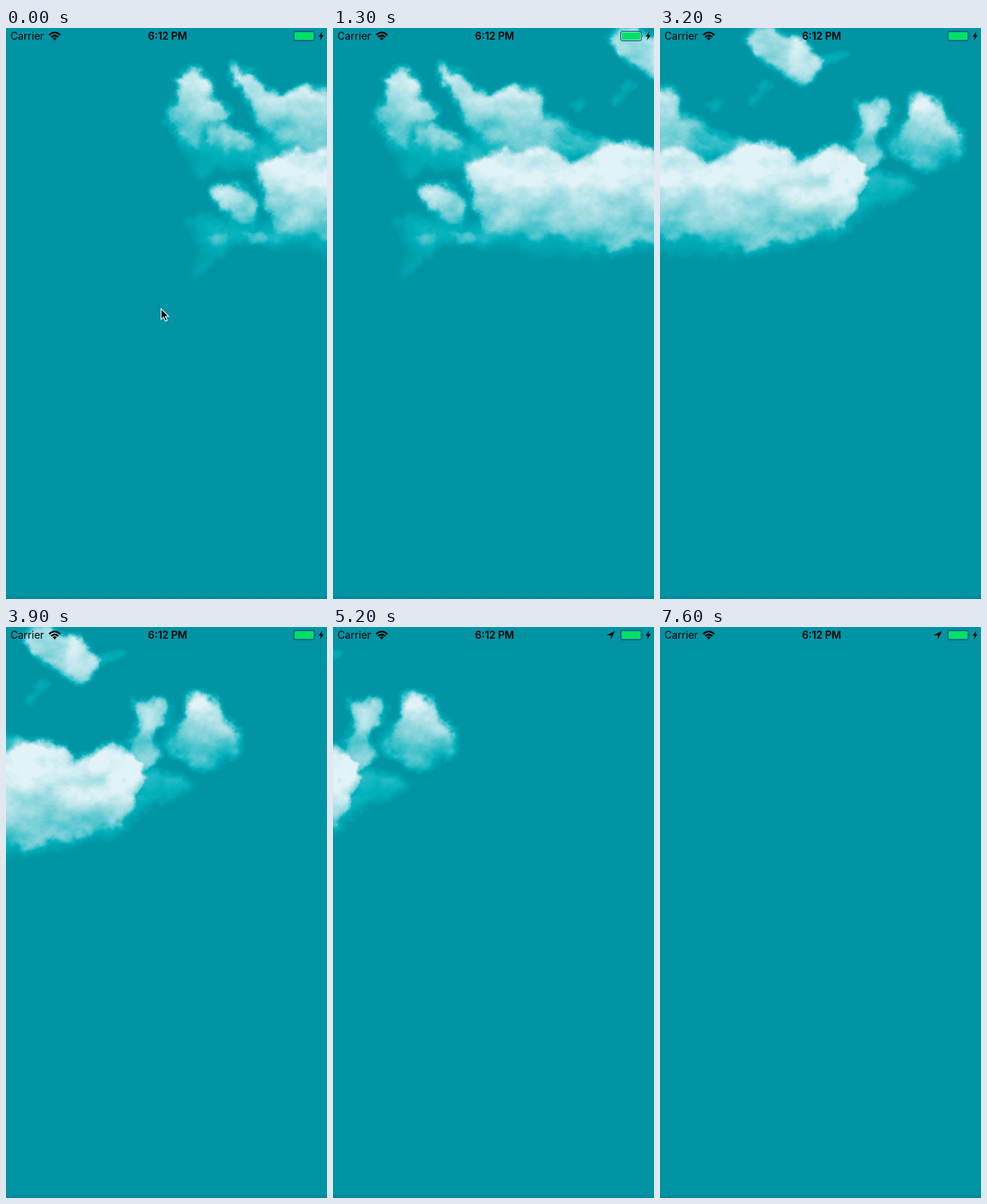
An HTML page with a canvas for the animation above (8000 ms loop, 438 by 780 pixels).

```html
<!DOCTYPE html>
<html lang="en">
<head>
<meta charset="utf-8">
<title>Drifting cloud</title>
<style>
  html, body { margin: 0; width: 100%; height: 100%; overflow: hidden; }
  body { position: relative; background: #0094a4; }
  body::after { content: ""; position: absolute; left: 0; right: 0; bottom: 0; height: 6px;
    background: linear-gradient(transparent, rgba(0, 70, 90, .2)); }
  canvas, svg { position: absolute; left: 0; top: 0; }
  text { font: 14px Inter, "Liberation Sans", sans-serif; }
  #clock { font-weight: 600; }
</style>
</head>
<body>
<canvas id="cloud" width="660" height="370"></canvas>
<svg width="438" height="780" viewBox="0 0 438 780">
  <text x="6" y="16">Carrier</text>
  <g fill="none" stroke="#000" stroke-width="2.3">
    <path d="M58.8 9.6Q66.5 2.6 74.2 9.6M61.6 12.4Q66.5 8 71.4 12.4"/>
    <path d="M63.6 13.9Q66.5 11.6 69.4 13.9L66.5 17Z" fill="#000" stroke="none"/>
  </g>
  <text id="clock" x="220.5" y="16" text-anchor="middle">6:12 PM</text>
  <path id="arrow" d="M385 5.5L373 11.2H379V17Z"/>
  <rect x="392.5" y="4.5" width="28.5" height="13" rx="2.5" fill="none" stroke="#00506a"/>
  <rect x="394" y="6" width="25.5" height="10" rx="1.2" fill="#04e065"/>
  <path d="M422.2 9Q424 11 422.2 13Z" fill="#00506a"/>
  <path d="M431.6 5L426.6 11.8H429.6L428.2 17L433.4 9.8H430.4Z"/>
  <path id="pointer" d="M211.6 383.5V398L215 394.9L217.6 400.6L220 399.5L217.5 394H222Z" stroke="#fff" stroke-width="1.1"/>
</svg>
<script>
const LOOP = 8000, STEP = 100, LEFT = 200;
const $ = id => document.getElementById(id);
const cloud = $("cloud"), W = cloud.width, H = cloud.height;

// Soft light map: each shape fades vertically from one brightness to another.
const map = document.createElement("canvas");
map.width = W; map.height = H;
const pen = map.getContext("2d", { willReadFrequently: true });
pen.fillRect(0, 0, W, H);
pen.translate(-LEFT, 0);
pen.globalCompositeOperation = "lighten";

function puff(y0, y1, top, low, path, blur = 4) {
  const fade = pen.createLinearGradient(0, y0, 0, y1);
  const gray = v => `rgb(${[v, v, v].map(c => Math.round(c * 255))})`;
  fade.addColorStop(0, gray(top));
  fade.addColorStop(1, gray(low));
  pen.filter = `blur(${blur}px)`;
  pen.fillStyle = fade;
  pen.fill(new Path2D(path));
}

// left tower and its haze
puff(150, 210, .3, .14, "M236 145L300 158 360 150 400 160 365 198 300 190 258 200Z", 8);
puff(60, 170, .9, .4, "M228 70L262 52 285 72 277 95 304 112 300 130 270 138 262 165 236 150 216 122 227 105 234 88Z");
puff(136, 170, .76, .4, "M273 140L300 133 330 145 338 163 300 169 276 162Z");
// upper ridge
puff(75, 172, .95, .42, "M304 52L325 60 345 65 352 82 384 85 410 76 433 89 450 100 453 122 470 134 492 152 500 168 440 166 400 167 372 155 345 130 326 104Z");
puff(110, 172, .6, .35, "M455 114L480 128 520 151 546 155 530 171 480 174Z");
// main bank
puff(250, 312, .42, .14, "M360 255L695 235 670 280 600 298 500 312 420 300 365 288Z", 8);
puff(195, 302, 1, .38, "M341 190L382 167 430 164 465 164 488 186 520 170 550 157 595 165 612 186 645 163 680 163 706 188 710 205 688 236 681 262 650 275 610 291 560 284 510 298 480 284 430 288 365 272 352 235Z");
puff(275, 305, .65, .5, "M504 302L540 286 592 274 570 296Z");
// lower left
puff(255, 320, .32, .2, "M252 253L300 262 345 265 382 272 376 302 330 290 295 313 266 312Z", 6);
puff(305, 348, .2, .06, "M268 308L304 312 242 347Z", 5);
puff(212, 264, .86, .55, "M282 220L300 211 331 222 346 240 336 264 305 260 293 240Z");
puff(275, 300, .58, .4, "M320 282L346 274 353 291 330 298Z", 3);
puff(280, 312, .52, .35, "M276 284L300 283 293 309Z", 3);
// small upper cloud and wisps
puff(5, 78, .86, .62, "M542 12L560 0 590 9 618 18 642 40 636 70 615 80 590 61 558 37Z");
puff(30, 50, .24, .18, "M640 36L684 34 674 45 642 52Z");
puff(70, 105, .26, .16, "M537 100L568 70 580 76 550 104Z");
puff(92, 112, .28, .16, "M476 104L512 94 508 106 490 112Z");
// right puff and bridge
puff(195, 270, .32, .14, "M700 192L774 212 744 236 700 250 680 280 676 240Z", 6);
puff(98, 190, .72, .5, "M688 104L715 98 736 106 739 130 716 150 730 175 712 192 685 180 680 150 698 134Z");
puff(110, 196, .92, .18, "M765 92L785 94 806 103 822 125 840 148 832 172 800 192 768 192 733 165 744 140 760 126Z");

// Seeded value noise.
let seed = 41;
const rnd = () => (seed = seed * 16807 % 2147483647) / 2147483647;
const grid = Float32Array.from({ length: 65536 }, rnd);
const at = (x, y) => grid[(y & 255) << 8 | x & 255];
const mix = (a, b, t) => a + (b - a) * t;
const ease = t => t * t * (3 - 2 * t);

function noise(x, y) {
  const i = Math.floor(x), j = Math.floor(y), u = ease(x - i), v = ease(y - j);
  return mix(mix(at(i, j), at(i + 1, j), u), mix(at(i, j + 1), at(i + 1, j + 1), u), v);
}
function fbm(x, y) {
  let sum = 0;
  for (let k = 0, amp = .5; k < 5; k++, amp *= .55) {
    sum += (noise(x, y) - .5) * amp;
    x = x * 2 + 17; y = y * 2 + 31;
  }
  return sum;
}

const ramp = [[0, 0, 148, 164], [.25, 0, 177, 188], [.6, 126, 209, 216], [1, 226, 243, 247]];
function shade(v) {
  let i = 1;
  while (i < 3 && v > ramp[i][0]) i++;
  const a = ramp[i - 1], b = ramp[i], t = Math.min(1, (v - a[0]) / (b[0] - a[0]));
  return [1, 2, 3].map(c => mix(a[c], b[c], t));
}
const tones = Array.from({ length: 257 }, (_, i) => shade(i / 256));

function paint() {
  const light = pen.getImageData(0, 0, W, H).data;
  const ctx = cloud.getContext("2d"), img = ctx.createImageData(W, H);
  const clamp = (v, hi) => Math.max(0, Math.min(hi, Math.round(v)));
  for (let y = 0; y < H; y++) for (let x = 0; x < W; x++) {
    const nx = fbm(x / 22, y / 22), ny = fbm(x / 22 + 90, y / 22 + 60);
    const sx = clamp(x + nx * 24, W - 1), sy = clamp(y + ny * 24, H - 1);
    const m = light[(sy * W + sx) * 4] / 255;
    const v = m * (1 + fbm(x / 34 + 40, y / 26 + 130) * (m < .4 ? 1.5 : 1.5 - m));
    const p = (y * W + x) * 4;
    img.data.set(tones[clamp(v * 256, 256)], p);
    img.data[p + 3] = clamp(v * 4000, 255);
  }
  ctx.putImageData(img, 0, 0);
}
paint();

// time, shift, speed
const track = [
  [0, 0, .122], [1300, 162, .129], [2300, 295, .138], [3200, 422, .138],
  [3900, 516, .128], [5200, 668, .104], [7300, 838, .055], [LOOP, 860, .01]
];
function shift(t) {
  const i = track.findIndex(k => k[0] > t);
  const [t0, x0, v0] = track[i - 1], [t1, x1, v1] = track[i];
  const d = t1 - t0, u = (t - t0) / d, w = 1 - u;
  return x0 * w * w * (1 + 2 * u) + x1 * u * u * (3 - 2 * u) + d * u * w * (v0 * w - v1 * u);
}

const show = (id, on) => $(id).style.visibility = on ? "visible" : "hidden";
const start = performance.now();
function frame() {
  const now = Math.max(0, performance.now() - start) % LOOP;
  const t = Math.floor(now / STEP) * STEP;
  cloud.style.transform = `translateX(${Math.round(LEFT - shift(t))}px)`;
  show("pointer", t < 500);
  show("arrow", t >= 4500);
  requestAnimationFrame(frame);
}
frame();
</script>
</body>
</html>
```
